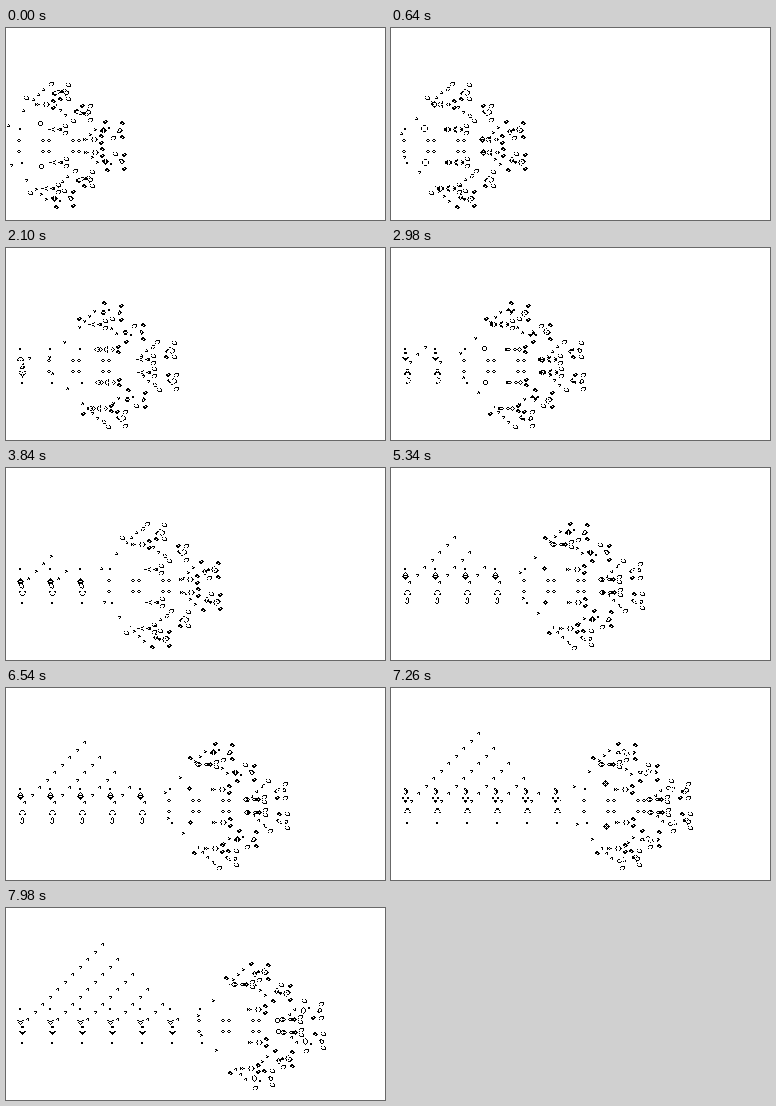
These frames come from a looping animation (379x192 px, 8000 ms). A matplotlib script:

```python
import numpy as np
import matplotlib.pyplot as plt
from matplotlib.animation import FuncAnimation

W, H = 379, 192
FRAMES, STEP_MS = 400, 20
GAP, CYCLE = 30, 60          # distance and time between two guns
MEET, FIRE = 47, 68          # a gun's parts meet, then it runs by itself

GUN = ("24bo$22bobo$12b2o6b2o12b2o$11bo3bo4b2o12b2o$2o8bo5bo3b2o$"
       "2o8bo3bob2o4bobo$10bo5bo7bo$11bo3bo$12b2o!")
RAKE = ("11b2o5b4o$9b2ob2o3bo3bo$9b4o8bo$10b2o5bo2bo2$8bo$7b2o8b2o$"
        "6bo9bo2bo$7b5o4bo2bo$8b4o3b2ob2o$11bo4b2o4$18b4o$o2bo13bo3bo$"
        "4bo16bo$o3bo12bo2bo$b4o!")
SCHICK = ("bo2bo$o$o3bo$4o9bo$6b3o5b2o$6b2ob2o6b3o$6b3o5b2o$4o9bo$"
          "o3bo$o$bo2bo!")
LWSS = "o2bo$4bo$o3bo$b4o!"
GLIDER = "bo$2bo$3o!"
BEEHIVE = "b2o$o2bo$b2o!"
BLOCK = "2o$2o!"
TEE = "3o$bo!"


def parse(rle):
    """Live cells of a run-length pattern as an array of (x, y)."""
    cells, x, y, num = [], 0, 0, ""
    for ch in rle:
        if ch.isdigit():
            num += ch
            continue
        n = int(num or 1)
        num = ""
        if ch == "o":
            cells += [(x + i, y) for i in range(n)]
        if ch == "$":
            x, y = 0, y + n
        else:
            x += n
    return np.array(cells)


def step(grid):
    rows = grid.astype(np.uint8)
    rows = rows + np.roll(rows, 1, 0) + np.roll(rows, -1, 0)
    total = rows + np.roll(rows, 1, 1) + np.roll(rows, -1, 1)
    return (total == 3) | (grid & (total == 4))


def evolve(cells, gens, shape=(110, 160), origin=(30, 45)):
    """List of cell arrays for generations 0 to gens."""
    grid = np.zeros(shape, bool)
    grid[cells[:, 1] + origin[1], cells[:, 0] + origin[0]] = True
    out = []
    for _ in range(gens + 1):
        out.append(np.argwhere(grid)[:, ::-1] - origin)
        grid = step(grid)
    return out


def half_speed_cycle(cells, period, warm=0, tail=999):
    """One period of an eastbound c/2 object, cut `tail` px behind its nose."""
    cycle = []
    for r, c in enumerate(evolve(cells, warm + period - 1)[warm:]):
        c = c - (warm // 2, 0)
        cycle.append(c[c[:, 0] > 20 + r / 2 - tail])
    return cycle


class Ship:
    def __init__(self, cycle, nose, x, y, phase=0, flip=False):
        self.cycle, self.phase = cycle, phase
        self.x = round(x - nose - phase / 2)
        self.y, self.sign = y, -1 if flip else 1

    def cells(self, t):
        k, r = divmod(t + self.phase, len(self.cycle))
        c = self.cycle[r]
        x = c[:, 0] + self.x + k * len(self.cycle) // 2
        return np.column_stack([x, self.y + self.sign * c[:, 1]])


def rake(x, top, phase, flip, tail):
    """x, top: centre of the upper leading ship at time 0."""
    cycle = half_speed_cycle(parse(RAKE), 20, 120, tail)
    return Ship(cycle, 19.5, x, top + 15 if flip else top - 2, phase, flip)


east_schick = parse(SCHICK) * (-1, 1) + (19, 0)
schick_cycle = half_speed_cycle(east_schick, 12)
lwss_cycle = half_speed_cycle(parse(LWSS), 4)


def schick(x, mid, phase=0):
    return Ship(schick_cycle, 17.5, x, int(mid - 5.5), phase)


fleet = [
    rake(62.5, 57, 4, True, 40),
    rake(84.5, 78, 4, False, 36),
    rake(116, 95, 11, True, 36),
    rake(118, 127, 11, False, 36),
    rake(86.5, 144, 4, True, 36),
    rake(67, 164, 11, False, 40),
    schick(47, 76.5, 3),
    schick(59.5, 101.5),
    schick(95, 111.5, 3),
    schick(96, 124.5, 3),
    schick(60.5, 134.5),
    schick(52.5, 160.5),
    Ship(lwss_cycle, 2.5, 20.5, 68),
    Ship(lwss_cycle, 2.5, 24.5, 163),
]

# The gun stands upright: its long axis runs up the stage.
gun_flat = parse(GUN)
gun = np.column_stack([11 + gun_flat[:, 1], 135 - gun_flat[:, 0]])
gun_life = evolve(gun, FRAMES, (H, W), (0, 0))
glider_life = evolve(parse(GLIDER), 3)
tee_life = evolve(parse(TEE), 20)
beehive, block = parse(BEEHIVE), parse(BLOCK)


def put(grid, cells, dx=0, dy=0):
    x, y = cells[:, 0] + dx, cells[:, 1] + dy
    ok = (x >= 0) & (x < W) & (y >= 0) & (y < H)
    grid[y[ok], x[ok]] = True


def put_glider(grid, age, x, y, up):
    k, r = divmod(age, 4)
    c = glider_life[r]
    if up:
        put(grid, c * (1, -1), x + k, y - k)
    else:
        put(grid, c, x + k, y + k)


def put_gun(grid, t, i):
    """Parts waiting, coming together, then firing."""
    x, age = GAP * i, t - CYCLE * i
    if -2 * CYCLE <= age < MEET:
        for y in (111, 122):
            put(grid, beehive, 11 + x, y)
            if age < -8:
                put(grid, beehive, 5 + x, y)
    if -15 <= age < MEET:
        put(grid, block, 13 + x, 100)
        put(grid, block, 15 + x, 134)
    elif MEET <= age < FIRE:
        c = gun_life[age - FIRE + 30]
        put(grid, c[c[:, 0] < 20], x)
    elif age >= FIRE:
        put(grid, gun_life[age - FIRE], x)


def put_burst(grid, age, x, y):
    if 0 <= age < 20:
        put(grid, tee_life[age // 2], x - 1, y)


def put_site(grid, t, k):
    """Short-lived debris and the two gliders that complete a gun."""
    x, age = GAP * k, t - CYCLE * k
    if -16 <= age < CYCLE + MEET:
        put_glider(grid, age, 16 + x, 81, False)
        put_glider(grid, age, 19 + x, 153, True)
    for start, dx, top, bottom in ((-14, 34, 95, 138), (14, 33, 100, 134),
                                   (24, 91, 112, 123)):
        put_burst(grid, age - start, dx + x, top)
        put_burst(grid, age - start, dx + x + 1, bottom)


def stage(t):
    grid = np.zeros((H, W), bool)
    for i in range(10):
        put_gun(grid, t, i)
    for k in range(-1, 8):
        put_site(grid, t, k)
    for ship in fleet:
        put(grid, ship.cells(t))
    return np.where(grid, 0, 255)


fig = plt.figure(figsize=(W / 100, H / 100), dpi=100, facecolor="white")
ax = fig.add_axes([0, 0, 1, 1])
ax.axis("off")
image = ax.imshow(stage(0), cmap="gray", vmin=0, vmax=255,
                  interpolation="nearest", aspect="auto")


def draw(t):
    image.set_data(stage(t))
    return [image]


anim = FuncAnimation(fig, draw, frames=FRAMES, interval=STEP_MS,
                     repeat=True, repeat_delay=0)
plt.show()
```
